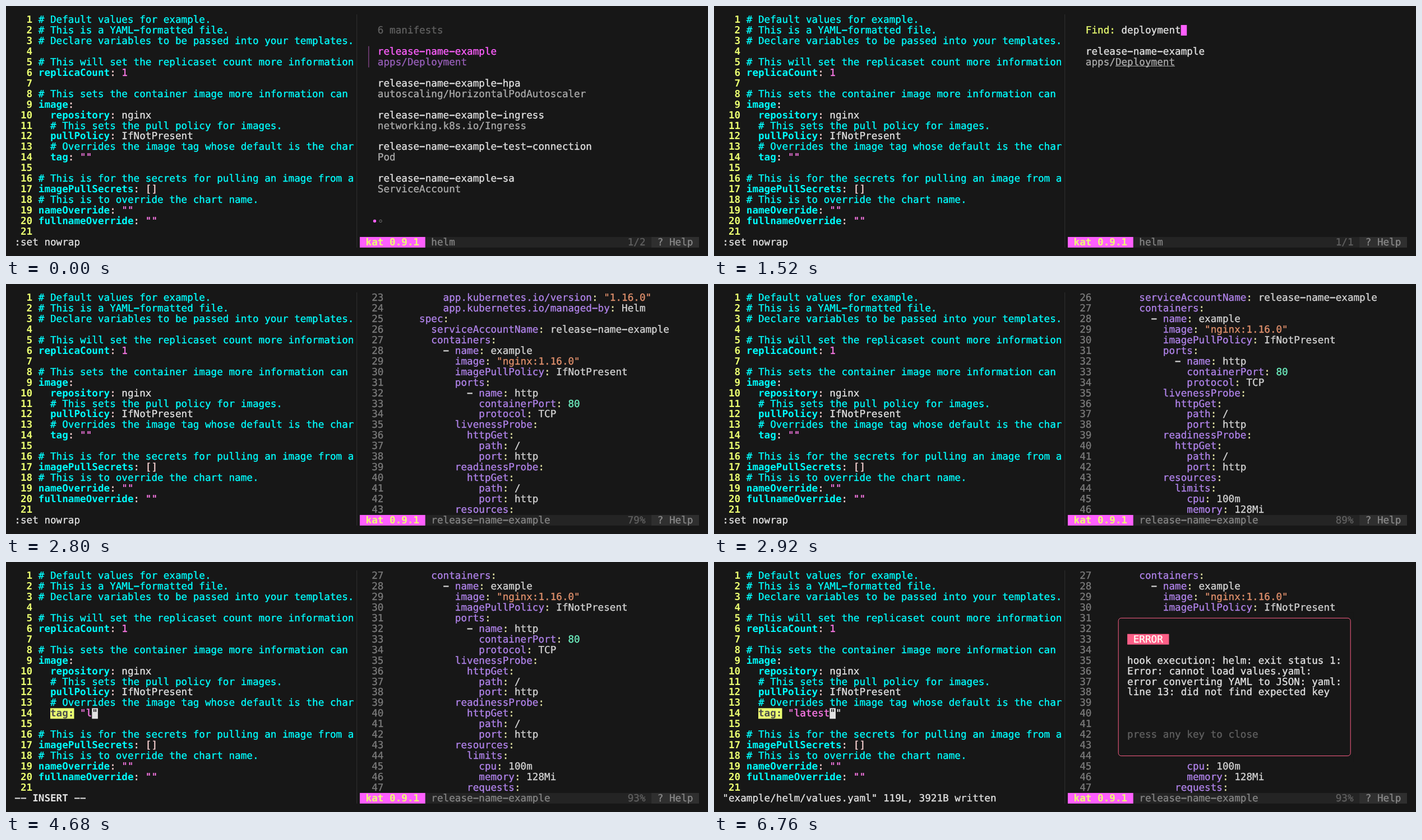
Animation, 1252 px wide and 447 px high, one loop 8000 ms. Source, as an HTML page with a canvas:

```html
<!DOCTYPE html>
<html lang="en">
<head>
<meta charset="utf-8">
<title>Terminal session</title>
<style>
  html, body { margin: 0; width: 100%; height: 100%; overflow: hidden; background: #171717; }
  canvas { display: block; }
</style>
</head>
<body>
<canvas id="stage" width="1252" height="447"></canvas>
<script>
const ctx = document.getElementById('stage').getContext('2d');
const LOOP = 8000, TICK = 40;
const X0 = 15.3, Y0 = 15, CELL_W = 10.615, CELL_H = 18.95;
const SPLIT = 58, STATUS_ROW = 21;

const BG = '#171717', FG = '#e2e2e2', YELLOW = '#ebff71', CYAN = '#00fefe', PINK = '#ff7aea';
const SPECIAL = '#ffd7d7', HOT = '#ff5fff', DIM = '#606060', RED = '#ff5f87';

const VALUES = `# Default values for example.
# This is a YAML-formatted file.
# Declare variables to be passed into your templates.

# This will set the replicaset count more information
replicaCount: 1

# This sets the container image more information can
image:
  repository: nginx
  # This sets the pull policy for images.
  pullPolicy: IfNotPresent
  # Overrides the image tag whose default is the char
  tag: ""

# This is for the secrets for pulling an image from a
imagePullSecrets: []
# This is to override the chart name.
nameOverride: ""
fullnameOverride: ""
`.split('\n');

const MANIFEST = `# Source: example/templates/deployment.yaml
apiVersion: apps/v1
kind: Deployment
metadata:
  name: release-name-example
  labels:
    helm.sh/chart: example-0.1.0
    app.kubernetes.io/name: example
    app.kubernetes.io/instance: release-name
    app.kubernetes.io/version: "1.16.0"
    app.kubernetes.io/managed-by: Helm
spec:
  selector:
    matchLabels:
      app.kubernetes.io/name: example
      app.kubernetes.io/instance: release-name
  template:
    metadata:
      labels:
        helm.sh/chart: example-0.1.0
        app.kubernetes.io/name: example
        app.kubernetes.io/instance: release-name
        app.kubernetes.io/version: "1.16.0"
        app.kubernetes.io/managed-by: Helm
    spec:
      serviceAccountName: release-name-example
      containers:
        - name: example
          image: "nginx:1.16.0"
          imagePullPolicy: IfNotPresent
          ports:
            - name: http
              containerPort: 80
              protocol: TCP
          livenessProbe:
            httpGet:
              path: /
              port: http
          readinessProbe:
            httpGet:
              path: /
              port: http
          resources:
            limits:
              cpu: 100m
              memory: 128Mi
            requests:`.split('\n');

const ITEMS = [
  ['', 'apps/Deployment'],
  ['-hpa', 'autoscaling/HorizontalPodAutoscaler'],
  ['-ingress', 'networking.k8s.io/Ingress'],
  ['-test-connection', 'Pod'],
  ['-sa', 'ServiceAccount'],
].map(([suffix, kind]) => ({ title: 'release-name-example' + suffix, kind }));

const ERROR_TEXT = [
  'hook execution: helm: exit status 1:',
  'Error: cannot load values.yaml:',
  'error converting YAML to JSON: yaml:',
  'line 13: did not find expected key',
];

const px = col => X0 + col * CELL_W;
const py = row => Y0 + row * CELL_H;

function fill(row, col, cols, color, rows = 1) {
  ctx.fillStyle = color;
  ctx.fillRect(px(col), py(row), cols * CELL_W, rows * CELL_H);
}

// Writes text on the character grid and returns the next free column.
function put(row, col, text, color, bold = false, bg = null) {
  if (bg) fill(row, col, text.length, bg);
  ctx.font = `${bold ? 'bold ' : ''}17.6px "DejaVu Sans Mono", monospace`;
  ctx.fillStyle = ctx.strokeStyle = color;
  ctx.lineWidth = 0.35;
  const y = Math.round(py(row) + 15);
  // The minus sign gives the wide hyphen of the terminal font.
  for (const ch of text.replaceAll('-', '\u2212')) {
    const x = px(col++);
    ctx.fillText(ch, x, y);
    if (!bold) ctx.strokeText(ch, x, y);
  }
  return col;
}

const cursor = (row, col, ch = ' ') => put(row, col, ch, BG, false, FG);

// Part of the text that has been typed by time t.
const typed = (text, start, step, t) =>
  text.slice(0, Math.max(0, Math.floor((t - start) / step) + 1));

// Positions of the query's letters in the text, or null if it does not match.
function fuzzy(query, text) {
  const hits = [];
  let from = 0;
  for (const ch of query) {
    const i = text.toLowerCase().indexOf(ch, from);
    if (i < 0) return null;
    hits.push(i);
    from = i + 1;
  }
  return hits;
}

function editorLine(line, row, found) {
  put(row, 0, String(row + 1).padStart(3), YELLOW, true);
  if (line.trim().startsWith('#')) return put(row, 4, line, CYAN);
  const match = line.match(/^(\s*)(\w+)(:)(\s*)("[^"]*"|\d+|\[\])?(.*)$/);
  if (!match) return;
  const [, indent, key, colon, gap, literal = '', rest] = match;
  let col = 4 + indent.length;
  if (found && key === 'tag') {
    col = put(row, col, key + colon, '#4d4d4d', true, YELLOW);
  } else {
    col = put(row, col, key, CYAN, true);
    col = put(row, col, colon, SPECIAL);
  }
  col = put(row, col + gap.length, literal, literal === '[]' ? SPECIAL : PINK);
  put(row, col, rest, FG);
}

function drawEditor(t) {
  const tag = typed('latest"', 4660, 58, t);
  const found = t >= 3960;
  VALUES.forEach((line, row) =>
    editorLine(row === 13 ? `  tag: "${tag}"` : line, row, found));

  const command = (text, active) => {
    const col = put(STATUS_ROW, 0, text, FG);
    if (active) cursor(STATUS_ROW, col);
  };
  if (t < 3160) {
    command(':set nowrap');
    if (t >= 3080) cursor(0, 4, '#');
  } else if (t < 4360) {
    command(typed('/tag:', 3160, 60, t), !found);
    if (t >= 4080) cursor(13, 11, '"');
    else if (found) cursor(13, 6, 't');
  } else if (t < 5600) {
    put(STATUS_ROW, 0, '-- INSERT --', FG, true);
    cursor(13, 12 + tag.length, '"');
  } else if (t >= 5680 && t < 6280) {
    command(t < 5720 ? ':' : ':w', true);
  } else {
    if (t >= 6280) command('"example/helm/values.yaml" 119L, 3921B written');
    cursor(13, 18, '"');
  }
}

function drawStatus(name, position) {
  fill(STATUS_ROW, SPLIT, 57, '#242424');
  put(STATUS_ROW, SPLIT, ' kat 0.9.1 ', YELLOW, true, HOT);
  put(STATUS_ROW, SPLIT + 12, name, '#858585');
  put(STATUS_ROW, SPLIT + 45, position.padStart(3), DIM);
  put(STATUS_ROW, SPLIT + 49, ' ? Help ', '#8a8a8a', false, '#2f2f2f');
}

function drawList(t) {
  const finding = t >= 480, filtered = t >= 1040;
  const query = t < 1000 ? '' : typed('deployment', 1010, 56, Math.max(t, 1010));
  const dimmed = finding && !query;
  const selecting = !finding || t >= 2040;
  const left = SPLIT + 3;

  if (finding) {
    put(1, left, 'Find:', YELLOW);
    const col = put(1, left + 6, query, FG);
    if (!selecting) fill(1, col, 1, HOT);
  } else {
    put(1, left, '6 manifests', DIM);
  }

  const shown = ITEMS.filter(item => !filtered || fuzzy(query, item.kind));
  shown.forEach(({ title, kind }, i) => {
    const row = 3 + i * 3, selected = selecting && i === 0;
    const kindColor = selected ? '#975fb8' : dimmed ? '#4d4d4d' : '#ababab';
    put(row, left, title, selected ? HOT : dimmed ? '#777777' : FG);
    put(row + 1, left, kind, kindColor);
    if (filtered) {
      ctx.fillStyle = kindColor;
      for (const hit of fuzzy(query, kind))
        ctx.fillRect(px(left + hit), Math.round(py(row + 1)) + 16, CELL_W, 1);
    }
    if (selected) {
      ctx.fillStyle = '#ad58b4';
      ctx.fillRect(px(59.5) - 0.5, py(row), 1, 2 * CELL_H);
    }
  });

  if (!filtered) {
    const y = py(19.5);
    ctx.beginPath();
    ctx.arc(px(60.5), y, 2.7, 0, 7);
    ctx.fillStyle = HOT;
    ctx.fill();
    ctx.beginPath();
    ctx.arc(px(61.5), y, 2.2, 0, 7);
    ctx.strokeStyle = '#777777';
    ctx.lineWidth = 1;
    ctx.stroke();
  }
  drawStatus('helm', filtered ? '1/1' : '1/2');
}

function manifestLine(line, row, number) {
  put(row, SPLIT, String(number).padStart(4), '#7a7a7a');
  const left = SPLIT + 6;
  if (line.startsWith('#')) return put(row, left, line, '#676767');
  const [, indent, dash = '', key, value] = line.match(/^(\s*)(- )?([^:]+):(.*)$/);
  const color = value.includes('"') ? '#e0906c' : /^ \d+$/.test(value) ? '#6eefc0' : '#d4d4d4';
  let col = put(row, left + indent.length, dash, '#d4d4d4');
  col = put(row, col, key, '#b083ea');
  col = put(row, col, ':', '#e8e8a8');
  put(row, col, value, color);
}

function drawManifest(t) {
  // A page down, then five single lines.
  const offset = t < 2600 ? 0 : t < 2800 ? 21 :
    t < 3000 ? Math.min(25, 22 + Math.floor((t - 2800) / TICK)) : 26;
  MANIFEST.slice(offset, offset + 21).forEach((line, row) =>
    manifestLine(line, row, offset + row + 1));
  drawStatus('release-name-example', Math.round(offset / 28 * 100) + '%');
}

function drawError() {
  fill(4, 66, 40, BG, 14);
  ctx.strokeStyle = RED;
  ctx.lineWidth = 1;
  ctx.beginPath();
  ctx.roundRect(px(66.5), py(4.5), 39 * CELL_W, 13 * CELL_H, 5);
  ctx.stroke();
  put(6, 68, ' ERROR ', '#fffdf5', false, RED);
  ERROR_TEXT.forEach((line, i) => put(8 + i, 68, line, FG));
  put(15, 68, 'press any key to close', DIM);
}

function draw(now) {
  const t = Math.floor(now % LOOP / TICK) * TICK;
  ctx.fillStyle = BG;
  ctx.fillRect(0, 0, 1252, 447);
  ctx.fillStyle = '#303030';
  ctx.fillRect(px(57.5) - 0.5, Y0, 1, 22 * CELL_H);
  drawEditor(t);
  if (t < 2080) drawList(t);
  else drawManifest(t);
  if (t >= 6760) drawError();
}

ctx.textRendering = 'geometricPrecision';
const start = performance.now();
function frame() {
  draw(performance.now() - start);
  requestAnimationFrame(frame);
}
frame();
</script>
</body>
</html>
```
